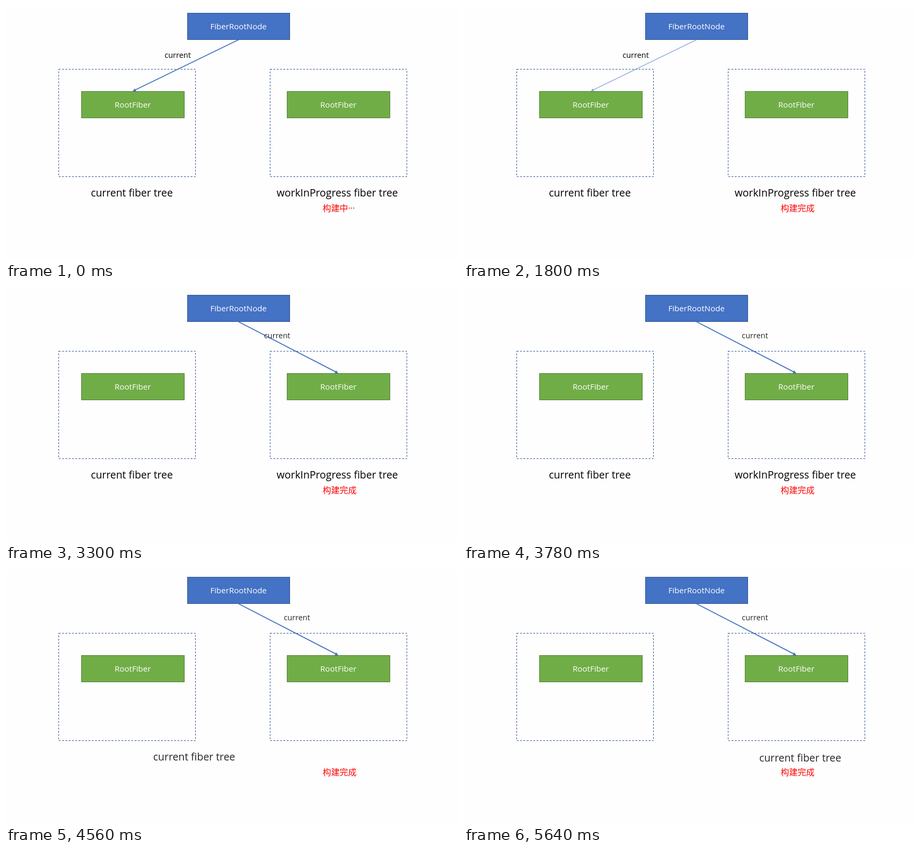
Recreate the animation shown at these times as an HTML page with a canvas. Size 853 by 480 pixels, loop 5.7 s.

```html
<!DOCTYPE html>
<html lang="zh-CN">
<head>
<meta charset="utf-8">
<title>Fiber tree switch</title>
<style>
  html, body { margin: 0; width: 100%; height: 100%; overflow: hidden; background: #fefefe; }
  canvas { display: block; }
</style>
</head>
<body>
<canvas id="stage" width="853" height="480"></canvas>
<script>
const ctx = document.getElementById('stage').getContext('2d');
const LOOP = 5700, STEP = 60, MOVE = 1490;
const BLUE = '#4472c4', NAVY = '#2f528f', GREEN = '#70ad47', MOSS = '#507e32';
const FONT = '"Open Sans", "Noto Sans CJK SC", "Noto Sans CJK JP", "Noto Sans CJK", sans-serif';

const progress = (t, start, length) => Math.min(1, Math.max(0, (t - start) / length));
const ease = u => (1 - Math.cos(Math.PI * u)) / 2;
const mix = (a, b, u) => a + (b - a) * u;

function text(str, x, y, size, fill, align = 'left') {
  ctx.font = `${size}px ${FONT}`;
  ctx.textAlign = align;
  ctx.fillStyle = fill;
  ctx.fillText(str, x, y);
}

function box(label, x, y, width, fill, stroke) {
  ctx.fillStyle = fill;
  ctx.strokeStyle = stroke;
  ctx.lineWidth = 1;
  ctx.fillRect(x, y, width, 50);
  ctx.strokeRect(x, y, width, 50);
  text(label, x + width / 2 - 0.3, y + 30.7, 15.1, '#fff', 'center');
}

function dashedFrame(x) {
  ctx.strokeStyle = NAVY;
  ctx.lineWidth = 1;
  ctx.setLineDash([3.55, 2.67]);
  ctx.strokeRect(x, 119.5, 258, 203);
  ctx.setLineDash([]);
}

function faded(alpha, draw) {
  if (alpha <= 0) return;
  ctx.globalAlpha = alpha;
  draw();
  ctx.globalAlpha = 1;
}

function arrow(x, y) {
  const dx = x - 438.8, dy = y - 63.7, length = Math.hypot(dx, dy);
  ctx.save();
  ctx.translate(x, y);
  ctx.rotate(Math.atan2(dy, dx));
  ctx.fillStyle = BLUE;
  ctx.fillRect(-length, -0.9, length - 4, 1.8);
  ctx.beginPath();
  ctx.moveTo(0, 0);
  ctx.lineTo(-6, -3);
  ctx.lineTo(-6, 3);
  ctx.fill();
  ctx.restore();
}

// Text that closes in from both sides towards its middle, with soft edges.
function splitText(str, x, y, size, width, closed) {
  if (closed >= 1) return;
  if (closed <= 0) return text(str, x, y, size, '#000');
  const soft = 14 / width, open = (1 - closed) / 2;
  const fill = ctx.createLinearGradient(x, 0, x + width, 0);
  const stop = (at, alpha) => fill.addColorStop(Math.min(1, Math.max(0, at)), `rgba(0,0,0,${alpha})`);
  stop(0.5 - open - soft / 2, 0);
  stop(Math.min(0.5, 0.5 - open + soft / 2), 1);
  stop(Math.max(0.5, 0.5 + open - soft / 2), 1);
  stop(0.5 + open + soft / 2, 0);
  text(str, x, y, size, fill);
}

function movingText(str, size, from, to, u) {
  const e = ease(u);
  text(str, mix(from[0], to[0], e), mix(from[1], to[1], e), size, u > 0 ? '#262626' : '#000');
}

function render(t) {
  ctx.fillStyle = '#fefefe';
  ctx.fillRect(0, 0, 853, 480);

  dashedFrame(99.5);
  dashedFrame(498.5);
  box('FiberRootNode', 342.5, 13.5, 193, BLUE, NAVY);
  box('RootFiber', 142.5, 161.5, 194, GREEN, MOSS);
  box('RootFiber', 530.5, 161.5, 194, GREEN, MOSS);

  faded(1 - progress(t, 1560, 500), () => arrow(239, 161));
  faded(progress(t, 2080, 500), () => arrow(627, 161));

  faded(1 - progress(t, 630, 480), () => text('构建中···', 597.5, 388, 16, '#f00'));
  faded(progress(t, 1090, 480), () => text('构建完成', 597.5, 388, 16, '#f00'));

  splitText('workInProgress fiber tree', 510.7, 359.7, 19.4, 230, progress(t, 3860, 500));
  movingText('current', 14.5, [299.3, 97.7], [524.3, 94.5], progress(t, 2208, MOVE));
  movingText('current fiber tree', 19.4, [160.2, 359.7], [557.2, 361.7], progress(t, 4014, MOVE));
}

function tick() {
  const t = performance.now() % LOOP;
  render(Math.floor(t / STEP) * STEP);
  requestAnimationFrame(tick);
}
tick();
</script>
</body>
</html>
```
